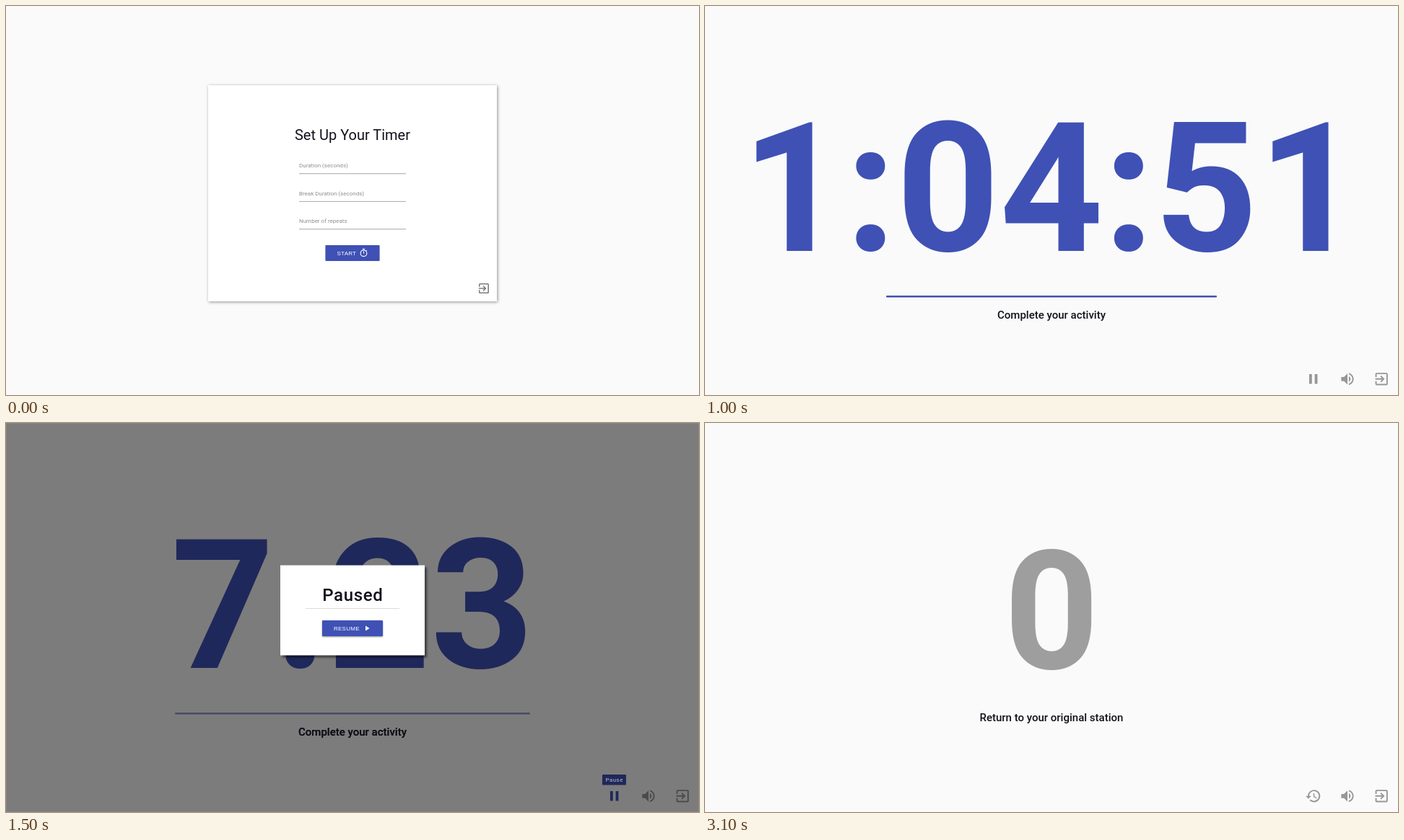
These frames come from a looping animation (960x540 px, 3.5 s). An HTML page:

```html
<!DOCTYPE html>
<html lang="en">
<head>
<meta charset="utf-8">
<title>Station timer</title>
<style>
  html, body { margin: 0; width: 100%; height: 100%; overflow: hidden; background: #fafafa; }
  svg { display: block; width: 100vw; height: 100vh; }
  text { font-family: Roboto, sans-serif; white-space: pre; }
  .mid { text-anchor: middle; }
  .big { font-weight: 700; }
  .caption { font-size: 15px; font-weight: 500; fill: #11111c; }
  .btn { font: 8px "Liberation Sans", Arial, sans-serif; letter-spacing: .25px; fill: #fff; }
  .tip { font-size: 8px; letter-spacing: .4px; }
  .card { fill: #fff; filter: drop-shadow(1px 1px 2px rgba(0, 0, 0, .42)); }
  .modal { fill: #fff; filter: drop-shadow(3px 3px 1.5px rgba(0, 0, 0, .5)); }
  .flat { filter: drop-shadow(0 .7px .7px rgba(0, 0, 0, .3)); }
  .raised { filter: drop-shadow(0 1.2px 1.3px rgba(0, 0, 0, .42)); }
</style>
</head>
<body>
<svg id="stage" viewBox="0 0 960 540"></svg>
<script>
const BLUE = '#3f51b5', RED = '#f44336', GREY = '#9e9e9e', ICON = '#979797', INK = '#11111c';

// Icon outlines on a 24-unit grid
const ICONS = {
  timer: 'M15 1H9v2h6zM11 14h2V8h-2zM19.03 7.39l1.42-1.42c-.43-.51-.9-.99-1.41-1.41l-1.42 1.42C16.07 4.74 14.12 4 12 4c-4.97 0-9 4.03-9 9s4.02 9 9 9 9-4.03 9-9c0-2.12-.74-4.07-1.97-5.61zM12 20a7 7 0 1 1 0-14 7 7 0 0 1 0 14z',
  exit: 'M10.09 15.59L11.5 17l5-5-5-5-1.41 1.41L12.67 11H3v2h9.67zM19 3H5a2 2 0 0 0-2 2v4h2V5h14v14H5v-4H3v4a2 2 0 0 0 2 2h14a2 2 0 0 0 2-2V5a2 2 0 0 0-2-2z',
  pause: 'M6 19h4V5H6zM14 5v14h4V5z',
  volume: 'M3 9v6h4l5 5V4L7 9zM16.5 12c0-1.77-1.02-3.29-2.5-4.03v8.05c1.48-.73 2.5-2.25 2.5-4.02zM14 3.23v2.06c2.89.86 5 3.54 5 6.71s-2.11 5.85-5 6.71v2.06c4.01-.91 7-4.49 7-8.77s-2.99-7.86-7-8.77z',
  history: 'M13 3a9 9 0 0 0-9 9H1l3.89 3.89.07.14L9 12H6a7 7 0 1 1 2.06 4.94l-1.42 1.42A9 9 0 1 0 13 3zM12 8v5l4.28 2.54.72-1.21-3.5-2.08V8z',
  play: 'M8 5v14l11-7z'
};

const rect = (x, y, w, h, fill, rest = '') =>
  `<rect x="${x}" y="${y}" width="${w}" height="${h}" fill="${fill}" ${rest}/>`;
const text = (x, y, str, rest = '') => `<text x="${x}" y="${y}" ${rest}>${str}</text>`;

// Icon centred on (x, y)
const icon = (name, x, y, size, fill) =>
  `<path d="${ICONS[name]}" fill="${fill}" transform="translate(${x - size / 2} ${y - size / 2}) scale(${size / 24})"/>`;

const caption = (str, y = 434) => text(480, y, str, 'class="mid caption"');
const big = (str, fill, size = 250, y = 339.6) =>
  text(480, y, str, `class="mid big" font-size="${size}" fill="${fill}"`);
const bar = (w, fill) => rect(480 - w / 2, 402, w, 2.5, fill, 'rx="1"');

const button = (x, y, w, label, fill, look) =>
  rect(x, y, w, 22, fill, `rx="1" class="${look}"`) + text(x + 16, y + 13.7, label, 'class="btn"');

const toolbar = (first = 'pause', colors = [ICON, ICON]) =>
  icon(first, 842.7, 517.8, 23, colors[0]) +
  icon('volume', 890, 517.8, 23, colors[1]) +
  icon('exit', 937.2, 517.8, 23, ICON);

function field(label, row, value) {
  const y = 224 + row * 38.5, active = value && row === 2;
  const tint = active ? BLUE : '#8f8f8f';
  const head = value
    ? text(406, y - 13.5, label, `font-size="6.4" fill="${tint}"`) +
      text(406, y, value, 'font-size="8" fill="#1c1c1c"')
    : text(406, y, label, `font-size="8" fill="${tint}"`);
  const line = active
    ? rect(406, y + 8.2, 148, 1.4, BLUE)
    : rect(406, y + 8.4, 148, .8, '#909090');
  return head + line;
}

function setup(values, fill, look) {
  const labels = ['Duration (seconds)', 'Break Duration (seconds)', 'Number of repeats'];
  return rect(280, 110, 400, 300, '#fff', 'class="card"') +
    text(480, 186, 'Set Up Your Timer', `class="mid" font-size="20" fill="${INK}"`) +
    labels.map((label, i) => field(label, i, values[i])).join('') +
    button(442.5, 332, 75, 'START', fill, look) +
    icon('timer', 495.5, 342.7, 13, '#fff') +
    icon('exit', 662, 392, 18.6, '#7c7c7c');
}

const spinner = rect(547, 294, 6.5, 9, '#efefef') +
  '<path d="M548 297.6l2.2-2.4 2.2 2.4zM548 299.4l2.2 2.4 2.2-2.4z" fill="#333"/>';

const paused =
  big('7.23', BLUE) + caption('Complete your activity') + toolbar('pause', [BLUE, ICON]) +
  rect(826, 488, 33, 14.5, BLUE, 'rx="1"') +
  rect(0, 0, 960, 540, '#000', 'opacity=".5"') +
  rect(.5, .5, 959, 539, 'none', 'stroke="#fff" stroke-opacity=".08"') +
  bar(492, '#484b66') + caption('Complete your activity') +
  text(842.7, 498.2, 'Pause', 'class="mid tip" font-weight="500" fill="#9a9db0"') +
  rect(380, 197.5, 200, 125, '#fff', 'class="modal"') +
  text(480.3, 247, 'Paused', `class="mid" font-size="24" font-weight="500" letter-spacing=".6" fill="${INK}"`) +
  rect(415, 257, 130, 1, '#dcdcdc') +
  button(438, 274, 84, 'RESUME', BLUE, 'raised') +
  icon('play', 500, 285, 12, '#fff');

const muting =
  big('5', RED) + bar(74, RED) + caption('Go to your next station') +
  '<circle cx="890" cy="517.5" r="15" fill="#dedede"/>' +
  toolbar('pause', [ICON, '#303f9f']) +
  rect(875.5, 488, 29, 14.5, '#616161', 'rx="1"') +
  text(890.2, 498.2, 'Mute', 'class="mid tip" fill="#fff"');

const scenes = [
  [0, setup([], BLUE, 'flat')],
  [500, setup(['3894', '106', '4'], '#616fc0', 'raised') + spinner],
  [1000, big('1:04:51', BLUE) + bar(458, BLUE) + caption('Complete your activity') + toolbar()],
  [1500, paused],
  [2000, muting],
  [2500, big('0', GREY, 229.5, 341.2) + caption('Return to your original station', 413.5) + toolbar('history')]
];
const LOOP = 3500;

const stage = document.getElementById('stage');
stage.innerHTML = rect(0, 0, 960, 540, '#fafafa') +
  scenes.map(([, body]) => `<g class="scene">${body}</g>`).join('');
const groups = [...stage.querySelectorAll('.scene')];

function draw(ms) {
  const t = ms % LOOP;
  const current = scenes.filter(([start]) => start <= t).length - 1;
  groups.forEach((g, i) => { g.style.display = i === current ? '' : 'none'; });
}

const begin = performance.now();
function tick() {
  draw(performance.now() - begin);
  requestAnimationFrame(tick);
}
tick();
</script>
</body>
</html>
```
